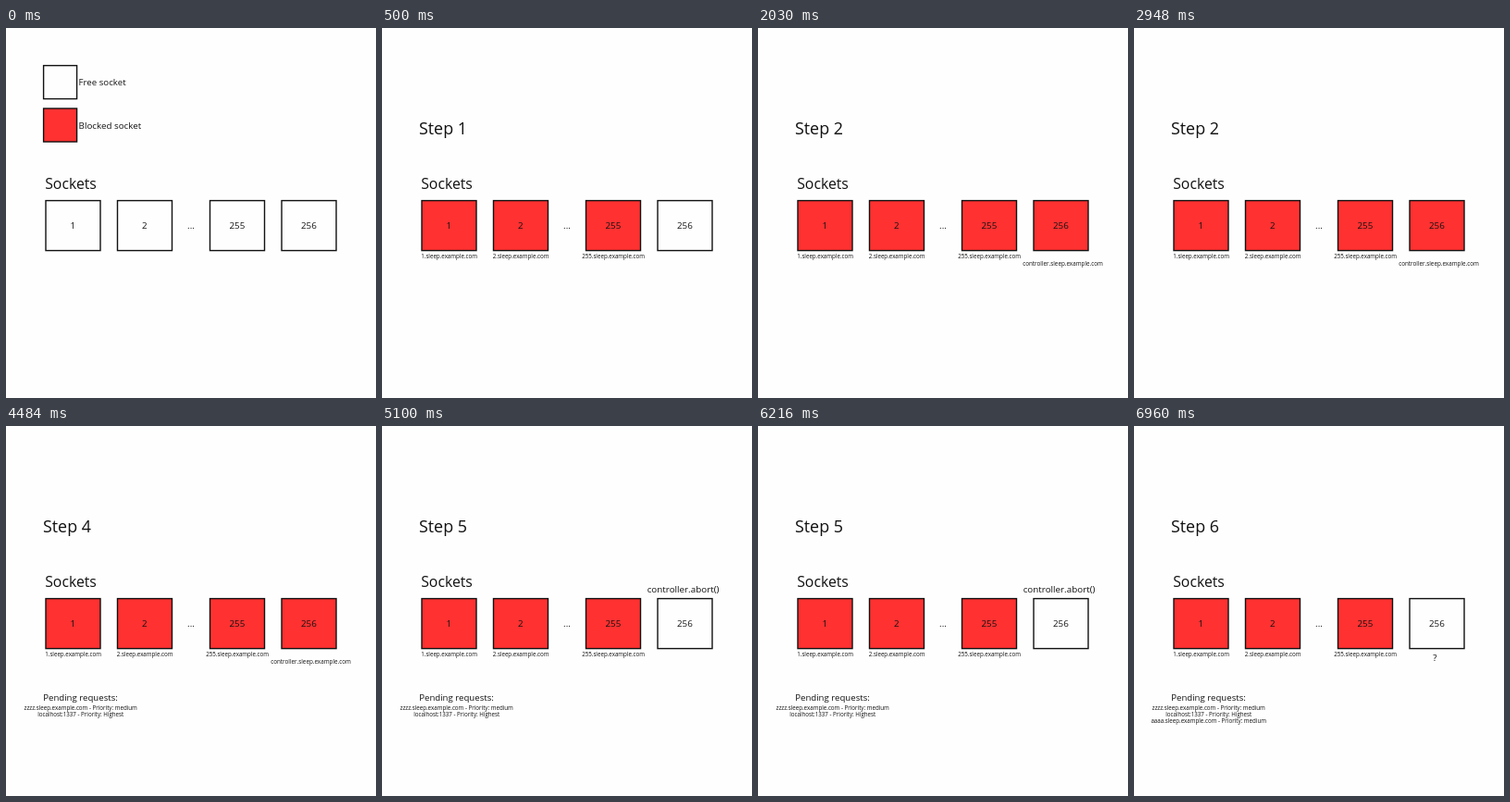
Write an HTML page that moves like this. It is 400x400 px and loops after 8 s.

```html
<!DOCTYPE html>
<html lang="en">
<head>
<meta charset="utf-8">
<title>Socket pool</title>
<style>
html, body { margin: 0; width: 100%; height: 100%; overflow: hidden; background: #fefefe; }
svg { display: block; width: 100vw; height: 100vh; font-family: "Open Sans", "Noto Sans", sans-serif; }
text { fill: #111; }
rect { stroke: #111; stroke-width: 1.4; }
</style>
</head>
<body>
<svg id="stage" viewBox="0 0 400 400"></svg>
<script>
const RED = "#ff3131", WHITE = "#fefefe";
const LOOP = 8000;
const SOCKETS = [[43, 1], [120.5, 2], [220.5, 255], [298, 256]];
const PENDING = ["zzzz.sleep.example.com - Priority: medium", "localhost:1337 - Priority: Highest",
  "aaaa.sleep.example.com - Priority: medium"];

// note: [text, y, size, x] drawn at the last socket
const HOST = ["controller.sleep.example.com", 256.6, 6.3, 329.5];
const SCENES = [
  { at: 0, legend: true, busy: 0, pending: 0 },
  { at: 500, step: 1, busy: 3, pending: 0 },
  { at: 2030, step: 2, busy: 4, pending: 0, note: HOST },
  { at: 3560, step: 4, busy: 4, pending: 2, note: HOST },
  { at: 5100, step: 5, busy: 3, pending: 2, note: ["controller.abort()", 180.2, 9.85, 325.6] },
  { at: 6960, step: 6, busy: 3, pending: 3, note: ["?", 254.3, 9.8, 325.3] }
];

const text = (s, x, y, size, anchor = "middle") =>
  `<text x="${x}" y="${y}" font-size="${size}" text-anchor="${anchor}">${s}</text>`;
const box = (x, y, w, h, fill) =>
  `<rect x="${x}" y="${y}" width="${w}" height="${h}" fill="${fill}"/>`;

function render({ legend, step, busy, pending, note }) {
  let out = text("Sockets", 42.2, 173.8, 15.8, "start") + text("...", 200, 217, 9.8);
  SOCKETS.forEach(([x, n], i) => {
    out += box(x, 186.6, 59, 54, i < busy ? RED : WHITE) + text(n, x + 29.4, 217.2, 9.8);
    if (i < Math.min(busy, 3)) out += text(n + ".sleep.example.com", x + 29.6, 249.2, 6.2);
  });
  if (legend) {
    out += box(40.6, 40.6, 36, 36, WHITE) + text("Free socket", 78.6, 62, 9.7, "start")
      + box(40.6, 87, 36, 36, RED) + text("Blocked socket", 78.6, 108.6, 9.8, "start");
  }
  if (step) out += text("Step " + step, 66, 115.2, 17.9);
  if (note) out += text(note[0], note[3], note[1], note[2]);
  if (pending) {
    out += text("Pending requests:", 80.5, 296.6, 9.65);
    PENDING.slice(0, pending).forEach((s, i) => out += text(s, 80.7, 306.8 + 7.2 * i, 6.2));
  }
  return out;
}

const stage = document.getElementById("stage");
let shown;
function frame() {
  const t = performance.now() % LOOP;
  const scene = SCENES.findLast(s => s.at <= t);
  if (scene !== shown) stage.innerHTML = render(shown = scene);
  requestAnimationFrame(frame);
}
frame();
</script>
</body>
</html>
```
